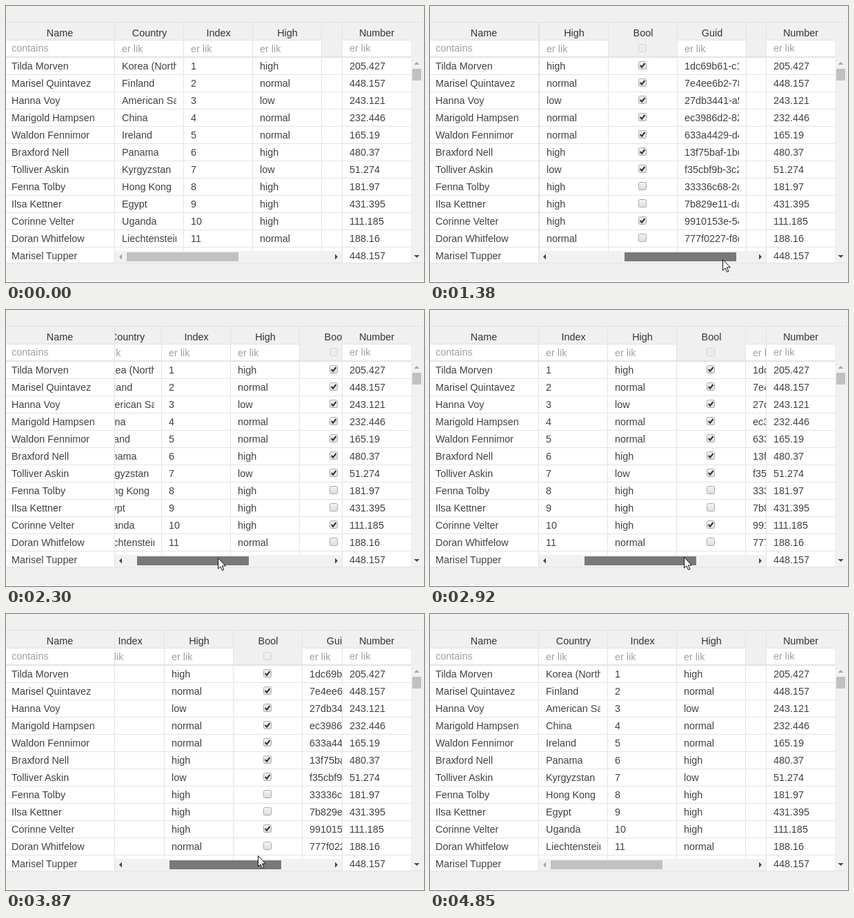
An HTML page that plays this animation: 606x400 px, repeating every 6120 ms.

```html
<!DOCTYPE html>
<html lang="en">
<head>
<meta charset="utf-8">
<title>Grid with frozen columns</title>
<style>
html, body { margin: 0; width: 100%; height: 100%; overflow: hidden; background: #fff; }
svg { display: block; }
#stage { width: 606px; height: 400px; }
text { font: 14.4px "Liberation Sans", Arial, sans-serif; fill: #404040; white-space: pre; }
.hint { fill: #a0a09c; }
.head { text-anchor: middle; fill: #333; }
</style>
</head>
<body>
<svg id="stage" viewBox="0 0 606 400"></svg>
<script>
const LOOP = 6120, GREY = '#f0f0f0', LINE = '#e3e3e3', TRACK = '#f0f2f2';
const DARK = '#484848', PALE = '#a3a3a3';
const ROW = 25, TOP = 75, COL = 100, LEFT = 157;

const names = ['Tilda Morven', 'Marisel Quintavez', 'Hanna Voy', 'Marigold Hampsen',
  'Waldon Fennimor', 'Braxford Nell', 'Tolliver Askin', 'Fenna Tolby', 'Ilsa Kettner',
  'Corinne Velter', 'Doran Whitfelow', 'Marisel Tupper'];
const numbers = ['205.427', '448.157', '243.121', '232.446', '165.19', '480.37', '51.274',
  '181.97', '431.395', '111.185', '188.16', '448.157'];
const countries = ['Korea (North)', 'Finland', 'American Samoa', 'China', 'Ireland', 'Panama',
  'Kyrgyzstan', 'Hong Kong', 'Egypt', 'Uganda', 'Liechtenstein'];
const levels = 'high normal low normal normal high low high high high normal'.split(' ');
const guids = ['1dc69b61-c14', '7e4ee6b2-78a', '27db3441-a5e', 'ec3986d2-82b', '633a4429-d4f',
  '13f75baf-1bd', 'f35cbf9b-3c2', '33336c68-2cd', '7b829e11-da0', '9910153e-54c', '777f0227-f8c'];
const unchecked = [7, 8, 10];
const tones = ['#444', '#a0a050', '#b0b080', '#777'];

const rect = (x, y, w, h, fill, more = '') =>
  `<rect x="${x}" y="${y}" width="${w}" height="${h}" fill="${fill}" ${more}/>`;
const text = (x, y, s, cls = '') => `<text x="${x}" y="${y}" class="${cls}">${s}</text>`;
const path = (d, fill, more = '') => `<path d="${d}" fill="${fill}" ${more}/>`;
const baseline = i => 92 + i * ROW;

function checkbox(x, y, on, off) {
  const box = rect(x + .5, y + .5, 11, 11, off ? '#ececec' : 'url(#box)',
    `rx="2" stroke="${off ? '#d4d4d4' : '#a9a9a9'}"`);
  return box + (on ? path(`M${x + 2.7} ${y + 6}l2.4 2.6l4.4 -5.6`, 'none',
    'stroke="#333" stroke-width="2.1"') : '');
}

function clippedCell(x, i, s) {
  return `<svg x="${x + 11}" y="${TOP + i * ROW}" width="79" height="24">${text(0, 17, s)}</svg>`;
}

const columns = [
  { title: 'Country', cell: (x, i) => clippedCell(x, i, countries[i]) },
  { title: 'Index', cell: (x, i) => clippedCell(x, i, i + 1) },
  { title: 'High', cell: (x, i) => clippedCell(x, i, levels[i]) },
  { title: 'Bool', plain: true, check: true,
    cell: (x, i) => checkbox(x + 44, 80 + i * ROW, !unchecked.includes(i)) },
  { title: 'Guid', cell: (x, i) => clippedCell(x, i, guids[i]) },
  { title: 'Image', plain: true,
    cell: (x, i) => `<circle cx="${x + 50}" cy="${87 + i * ROW}" r="8.5" fill="${tones[i % 4]}"/>` }
];

function scrollingPart() {
  return columns.map((c, k) => {
    const x = LEFT + k * COL;
    let out = text(x + 51, 44, c.title, 'head');
    if (!c.plain) {
      out += rect(x, 49, COL, 1, LINE) + rect(x, 50, COL, 23, '#fff') + text(x + 11, 67, 'er lik', 'hint');
    }
    if (c.check) out += checkbox(x + 44, 55, false, true);
    for (let i = 0; i < 11; i++) out += c.cell(x, i);
    return out + rect(x, 24, 1, 348, LINE);
  }).join('');
}

function fixedPart() {
  let out = rect(0, 0, 605, 397, GREY) + rect(0, TOP, 587, 297, '#fff')
    + rect(0, 23, 605, 1, LINE) + rect(0, 372, 605, 1, LINE) + rect(0, 397, 605, 1, LINE)
    + rect(604, 0, 1, 398, LINE);
  for (const [x, w] of [[0, 157], [488, 99]]) {
    out += rect(x, 49, w, 1, LINE) + rect(x, 50, w, 23, '#fff');
  }
  for (let y = 99; y < 372; y += ROW) out += rect(0, y, 587, 1, LINE);
  out += text(78, 44, 'Name', 'head') + text(537.5, 44, 'Number', 'head')
    + text(8, 66, 'contains', 'hint') + text(498, 66, 'er lik', 'hint');
  names.forEach((n, i) => out += text(8, baseline(i), n) + text(498, baseline(i), numbers[i]));
  return out;
}

function scrollbars() {
  return rect(587, TOP, 17, 297, TRACK) + rect(589, 91, 13, 17, '#c1c1c1')
    + path('M591.5 85h8l-4 -4z', PALE) + path('M591.5 361h8l-4 4z', DARK)
    + rect(158, 355, 329, 17, TRACK)
    + path('M168 359.5v8l-4 -4z', PALE, 'id="back"') + path('M477 359.5v8l4 -4z', DARK)
    + rect(175, 357, 162, 13, '#c1c1c1', 'id="thumb"');
}

const stage = document.getElementById('stage');
stage.innerHTML = `<defs>
  <linearGradient id="box" x2="0" y2="1"><stop stop-color="#f4f4f4"/><stop offset="1" stop-color="#dedede"/></linearGradient>
  <clipPath id="view"><rect x="158" y="24" width="329" height="348"/></clipPath></defs>`
  + fixedPart()
  + `<g clip-path="url(#view)"><g id="scroller">${scrollingPart()}</g></g>`
  + rect(0, 73, 587, 2, LINE) + rect(157, 24, 1, 348, LINE) + rect(487, 24, 1, 348, LINE)
  + scrollbars()
  + path('M.5 .5V16L4 12.8L6.4 18.4L8.8 17.4L6.4 11.9H11.3Z', '#fff', 'id="cursor" stroke="#111"');

const [scroller, back, thumb, cursor] =
  ['scroller', 'back', 'thumb', 'cursor'].map(id => document.getElementById(id));

// time, scroll offset, thumb x, cursor x, cursor y
const keys = [
  [70, 0, 175, 415, 396],
  [360, 0, 175, 372, 376],
  [660, 0, 175, 309, 364],
  [830, 8, 178, 311, 364],
  [1380, 199, 282, 424, 367],
  [1520, 234, 290, 428, 366],
  [2070, 76, 212, 332, 361],
  [2300, 32, 190, 307, 359],
  [2450, 0, 175, 302, 358],
  [2610, 6, 178, 309, 358],
  [3230, 213, 279, 422, 357],
  [3387, 234, 290, 426, 356],
  [3870, 128, 237, 365, 350],
  [4320, 0, 175, 303, 346],
  [4470, 0, 175, 318, 330],
  [4770, 0, 175, 547, 27]
];
// bursts of picture changes: start, end, steps
const bursts = [[70, 660, 9], [830, 1380, 8], [1460, 2070, 9], [2160, 2450, 5],
  [2610, 3160, 8], [3230, 3780, 8], [3870, 4320, 7], [4470, 4850, 6]];

// holds the picture between steps, which fall on whole hundredths of a second
function snap(t) {
  const b = bursts.filter(([start]) => t >= start).pop();
  if (!b) return 0;
  const [start, end, n] = b, gap = (end - start) / (n - 1);
  const at = k => Math.floor((start + k * gap) / 10 + 1e-6) * 10;
  let k = n - 1;
  while (at(k) > t) k--;
  return at(k);
}

const slope = (i, c) => (keys[i + 1][c] - keys[i][c]) / (keys[i + 1][0] - keys[i][0]);

function tangent(i, c) {
  if (i === 0) return slope(0, c);
  if (i === keys.length - 1) return slope(i - 1, c);
  const a = slope(i - 1, c), b = slope(i, c);
  return a * b > 0 ? 2 * a * b / (a + b) : 0;
}

// monotone cubic through the keys
function value(t, c) {
  const last = keys.length - 1;
  if (t <= keys[0][0]) return keys[0][c];
  if (t >= keys[last][0]) return keys[last][c];
  const i = keys.findIndex(k => k[0] > t) - 1;
  const h = keys[i + 1][0] - keys[i][0], u = (t - keys[i][0]) / h, v = 1 - u;
  return v * v * (1 + 2 * u) * keys[i][c] + u * u * (3 - 2 * u) * keys[i + 1][c]
    + h * u * v * (v * tangent(i, c) - u * tangent(i + 1, c));
}

function draw(time) {
  const t = snap(time % LOOP);
  const [scroll, x, cx, cy] = [1, 2, 3, 4].map(c => Math.round(value(t, c)));
  const shown = t >= 70 && t < 4850;
  const dragging = t >= 660 && t < 4470;
  const hover = shown && cy >= 357 && cy < 371;
  scroller.setAttribute('transform', `translate(${-scroll} 0)`);
  thumb.setAttribute('x', x);
  thumb.setAttribute('fill', dragging ? '#787878' : hover ? '#a8a8a8' : '#c1c1c1');
  back.setAttribute('fill', scroll > 0 ? DARK : PALE);
  cursor.setAttribute('visibility', shown ? 'visible' : 'hidden');
  cursor.setAttribute('transform', `translate(${cx} ${cy})`);
}

const began = performance.now();
function tick() {
  draw(performance.now() - began);
  requestAnimationFrame(tick);
}
tick();
</script>
</body>
</html>
```
